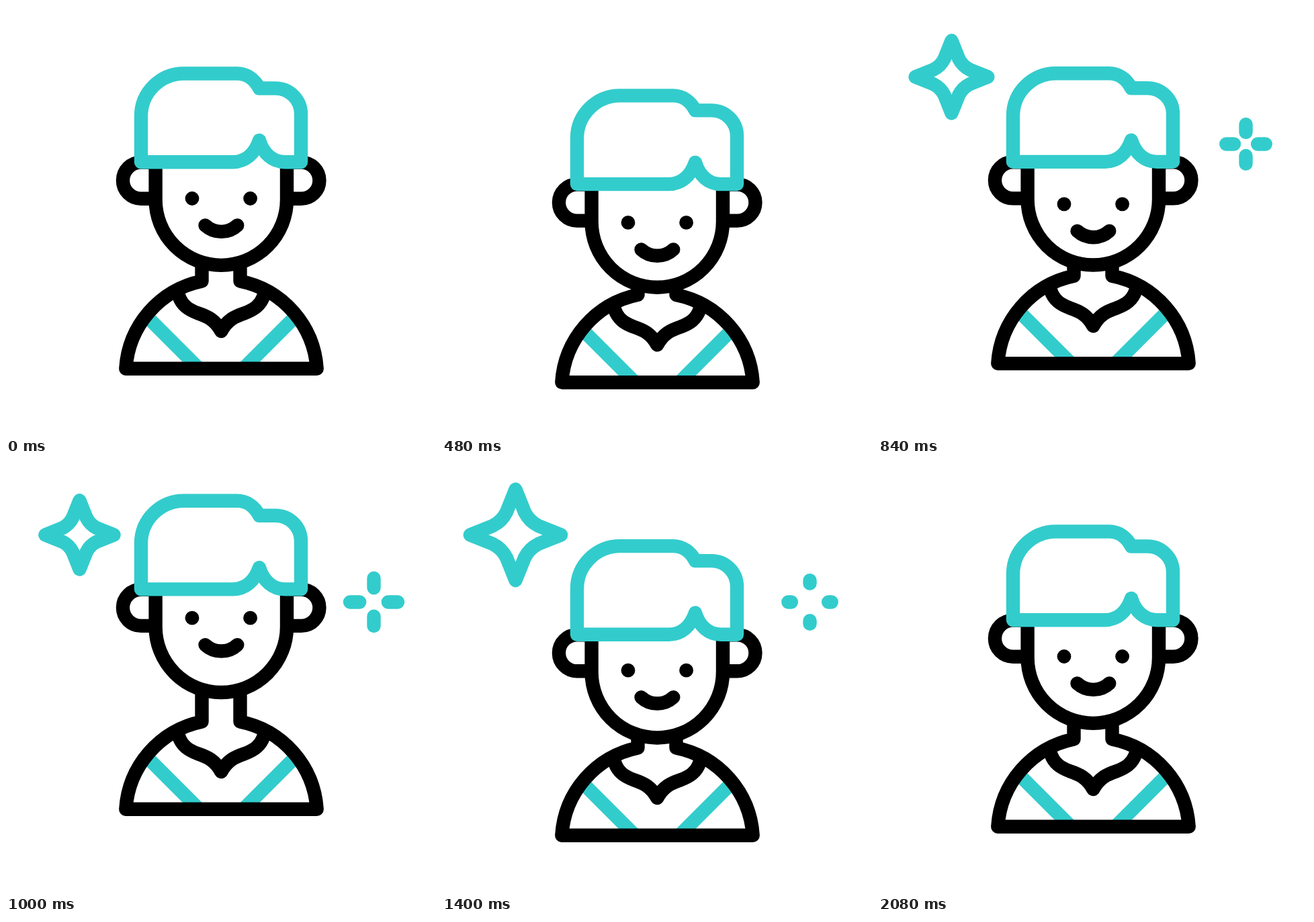
An HTML page with a canvas that plays this animation: 640 px wide and 640 px high, repeating every 2200 ms.

```html
<!DOCTYPE html>
<html lang="en">
<head>
<meta charset="utf-8">
<title>Bobbing boy</title>
<style>
html, body { margin: 0; width: 100%; height: 100%; overflow: hidden; background: #fff; }
canvas { display: block; width: 100vmin; height: 100vmin; }
</style>
</head>
<body>
<canvas id="stage" width="640" height="640"></canvas>
<script>
const ctx = document.getElementById('stage').getContext('2d');
const LOOP = 2200, STEP = 40, LINE = 20.4;
const BLACK = '#000', TEAL = '#33cccc', WHITE = '#fff';

const path = d => new Path2D(d);
const shapes = {
  stripes: path('M212 464.5L288 540.5M428.5 464.5L352.5 540.5'),
  torso: path('M291.5 340V409.5A142.3 142.3 0 0 0 178.3 539.8H462.7A142.3 142.3 0 0 0 348.5 409.5V340'),
  collar: path('M257 431C262 446 272 452 285 457C300 462 311 467 320.3 484C329.6 467 340.6 462 355.6 457C368.6 452 378.6 446 383.6 431'),
  ears: path('M222 286.7H201A27 27 0 0 1 201 232.6H222M418 286.7H439.4A27 27 0 0 0 439.4 232.6H418'),
  face: path('M222.6 232V288.2A97.7 97.7 0 0 0 418 288.2V232'),
  smile: path('M296.5 326.5C310 339 331 339 344.3 326.5'),
  hair: path('M201 232.2V164A64 63.5 0 0 1 265 100.5H344C358 100.5 370 109 377 122.5H401A38 38 0 0 1 439 160.5V232.2H415C397 232 383 220 377 200C370 220 356 232 338 232.2Z')
};

// Keys are [time, value] pairs, eased in and out between neighbours.
const bodyKeys = [[200, 0], [600, 26], [1000, -26], [1400, 13], [1800, 0]];
const headKeys = [[280, 0], [680, 25], [1080, -25], [1480, 12.5], [1880, 0]];
const faceKeys = [[360, 0], [760, 14], [1040, -13], [1680, 7.3], [2080, 0]];
const starKeys = [[480, 0], [655, 68], [920, 50], [1440, 68], [1690, 0]];

const clamp = x => Math.min(1, Math.max(0, x));
const smooth = x => x * x * (3 - 2 * x);
const mix = (a, b, p) => a + (b - a) * p;

function track(keys, t) {
  let value = keys[0][1];
  for (let i = 1; i < keys.length; i++) {
    const [t0, v0] = keys[i - 1], [t1, v1] = keys[i];
    if (t >= t0) value = mix(v0, v1, smooth(clamp((t - t0) / (t1 - t0))));
  }
  return value;
}

function stroke(shape, color = BLACK, fill) {
  if (fill) {
    ctx.fillStyle = fill;
    ctx.fill(shape);
  }
  ctx.strokeStyle = color;
  ctx.stroke(shape);
}

function group(x, y, draw) {
  ctx.save();
  ctx.translate(x, y);
  draw();
  ctx.restore();
}

function drawBody() {
  ctx.lineCap = 'butt';
  stroke(shapes.stripes, TEAL);
  ctx.lineCap = 'round';
  stroke(shapes.torso);
  stroke(shapes.collar);
}

function drawFeatures() {
  ctx.fillStyle = BLACK;
  for (const x of [277, 363.6]) {
    ctx.beginPath();
    ctx.arc(x, 286.5, 10.4, 0, 2 * Math.PI);
    ctx.fill();
  }
  stroke(shapes.smile);
}

function drawHead(faceY) {
  stroke(shapes.ears, BLACK, WHITE);
  stroke(shapes.face, BLACK, WHITE);
  group(0, faceY, drawFeatures);
  stroke(shapes.hair, TEAL, WHITE);
}

function drawStar(size) {
  if (size < 0.3) return;
  ctx.lineWidth = LINE * clamp(size / 15);
  ctx.beginPath();
  ctx.moveTo(0, -size);
  for (let i = 0; i < 4; i++) {
    const a = i * Math.PI / 2, c = Math.cos(a) * size, s = Math.sin(a) * size;
    const at = (x, y) => [x * c - y * s, x * s + y * c];
    ctx.lineTo(...at(0.2, -0.5));
    ctx.quadraticCurveTo(...at(0.3, -0.3), ...at(0.5, -0.2));
    ctx.lineTo(...at(1, 0));
  }
  ctx.closePath();
  ctx.strokeStyle = TEAL;
  ctx.stroke();
}

// Four dashes pop out, settle back, then shorten towards their outer ends.
function drawSparkle(t) {
  if (t < 680 || t > 1480) return;
  const outer = t < 925
    ? 44 * (t - 671) / 254
    : mix(44, 32.2, smooth(clamp((t - 925) / 115)));
  const inner = outer * mix(0.6, 1, smooth(clamp((t - 1280) / 200)));
  ctx.beginPath();
  for (const [x, y] of [[1, 0], [0, 1], [-1, 0], [0, -1]]) {
    ctx.moveTo(x * inner, y * inner);
    ctx.lineTo(x * outer, y * outer);
  }
  ctx.strokeStyle = TEAL;
  ctx.stroke();
}

function render(t) {
  ctx.fillStyle = WHITE;
  ctx.fillRect(0, 0, 640, 640);
  ctx.lineWidth = LINE;
  ctx.lineCap = ctx.lineJoin = 'round';
  const bodyY = track(bodyKeys, t);
  group(0, bodyY, drawBody);
  group(0, bodyY + track(headKeys, t), () => drawHead(track(faceKeys, t)));
  group(109.5, 105.5, () => drawStar(track(starKeys, t)));
  group(547.5, 205.5, () => drawSparkle(t));
}

const start = performance.now();
function tick() {
  const t = (performance.now() - start) % LOOP;
  render(Math.floor(t / STEP) * STEP);
  requestAnimationFrame(tick);
}
tick();
</script>
</body>
</html>
```
